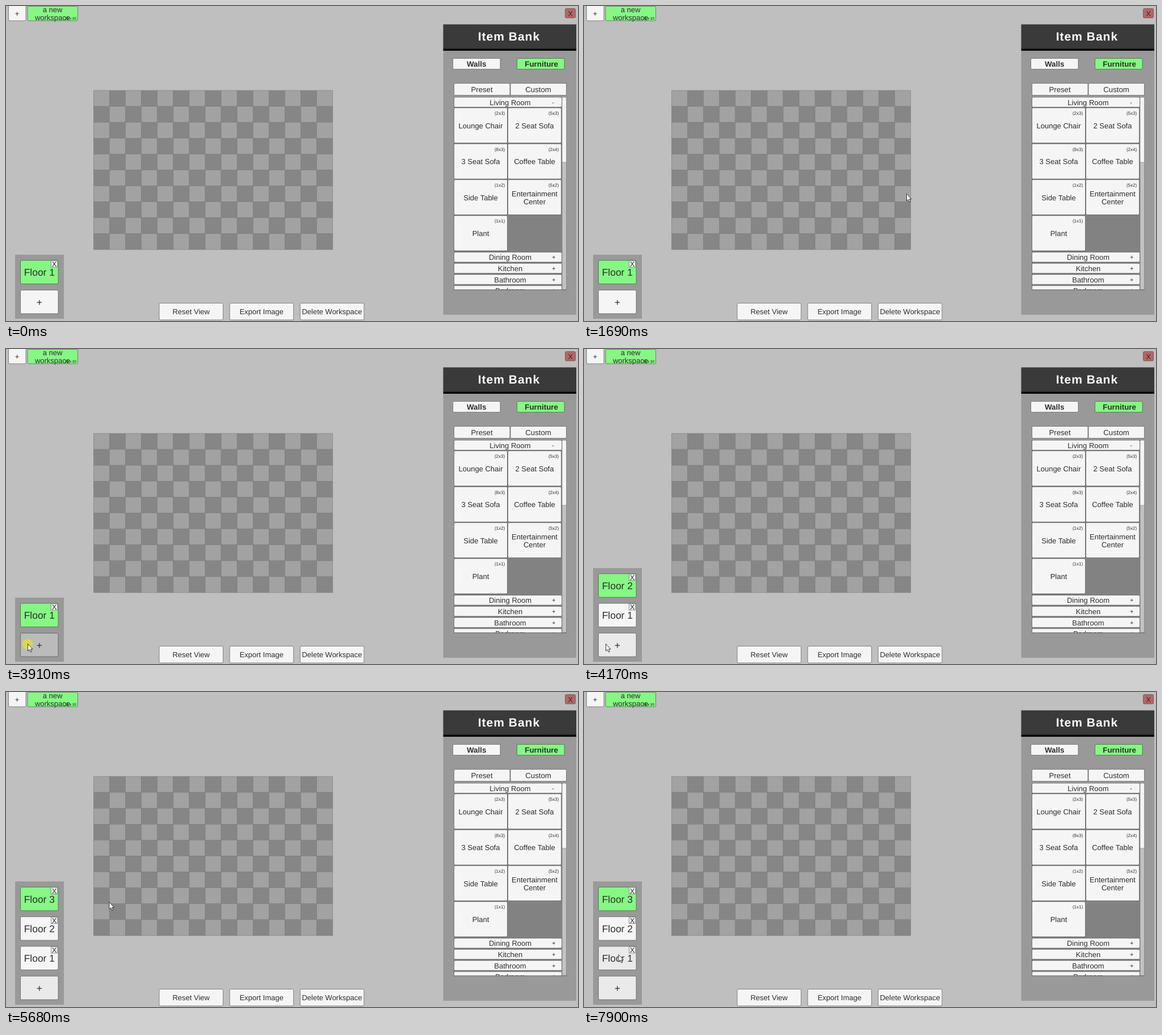
Write an HTML page that moves like this. It is 1008 by 556 pixels and loops after 8000 ms.

```html
<!DOCTYPE html>
<html lang="en">
<head>
<meta charset="utf-8">
<title>Floor planner</title>
<style>
  html, body { margin: 0; width: 100%; height: 100%; overflow: hidden; background: #bfbfbf; }
  svg {
    display: block; width: 100%; height: 100%; fill: #2e2e2e; text-anchor: middle;
    font-family: "Liberation Sans", Arial, sans-serif; text-rendering: geometricPrecision;
  }
</style>
</head>
<body>
<svg id="stage" viewBox="0 0 1008 556"></svg>
<script>
const LOOP = 8000, STEP = 70;
const GREEN = '#86f784', WHITE = '#f5f5f5', PANEL = '#999';
const stage = document.getElementById('stage');

function add(parent, tag, attrs) {
  const el = document.createElementNS('http://www.w3.org/2000/svg', tag);
  for (const k in attrs) el.setAttribute(k, attrs[k]);
  return parent.appendChild(el);
}
function box(x, y, width, height, fill, extra, parent = stage) {
  return add(parent, 'rect', { x, y, width, height, fill, ...extra });
}
// Text placed by the middle of its capitals
function label(str, x, y, size = 13, extra = {}, parent = stage) {
  add(parent, 'text', { x, y: y + size * 0.36, 'font-size': size, ...extra }).textContent = str;
}
function button(x, y, w, h, fill = WHITE, parent = stage) {
  return box(x, y, w, h, fill, { rx: 2, stroke: '#333', 'stroke-width': .8, 'stroke-opacity': .65 }, parent);
}

// Top bar
button(4.5, -2.5, 30.5, 28.5);
label('+', 19.5, 13.5);
button(38, .5, 88.5, 25.5, GREEN);
label('a new', 82, 6);
label('workspace', 82, 20);
label('15 x 10', 123.8, 21.5, 6.3, { 'text-anchor': 'end', fill: '#000' });
button(985.5, 4.5, 18, 16.5, '#b66565');
label('X', 994.5, 13);

// Floor grid
const CELL = 28.1;
for (let r = 0; r < 10; r++)
  for (let c = 0; c < 15; c++)
    box(154.3 + c * CELL, 149 + r * CELL, CELL, CELL, (r + c) % 2 ? '#868686' : '#a2a2a2',
      { stroke: '#7c7c7c', 'stroke-width': .6 });

// Bottom buttons
['Reset View', 'Export Image', 'Delete Workspace'].forEach((name, i) => {
  button(270 + i * 124.2, 524.5, 112.5, 29.5);
  label(name, 326.2 + i * 124.1, 539.5);
});

// Item bank
const BOLD = { 'font-weight': 700 };
box(770.5, 32.5, 234.5, 512.5, PANEL);
box(770.5, 32.5, 234.5, 43.5, '#3a3a3a');
box(770.5, 75.5, 234.5, 3.5, '#050505');
label('Item Bank', 886.4, 53.5, 21, { ...BOLD, 'letter-spacing': 1, fill: '#fff' });
['Walls', 'Furniture'].forEach((name, i) => {
  button(787.5 + i * 113, 92.5, 83.5, 19, i ? GREEN : WHITE);
  label(name, 829.2 + i * 114.4, 102, 13.4, BOLD);
});
['Preset', 'Custom'].forEach((name, i) => {
  button(789.5 + i * 99.5, 136.5, 98.5, 21);
  label(name, 838.5 + i * 99.5, 147, 13.2);
});

box(0, 0, 0, 0, 'none');
add(add(stage, 'clipPath', { id: 'list' }), 'rect', { x: 788, y: 160.5, width: 200, height: 340.5 });
const list = add(stage, 'g', { 'clip-path': 'url(#list)' });
box(789, 161, 191, 340, '#828282', {}, list);

const hovers = [];
function item(x, y, w, h) {
  hovers.push({ el: button(x, y, w, h, WHITE, list), x, y, w, h });
}
function heading(name, cy, sign, signX) {
  item(789.5, cy - 8.5, 190, 17.5);
  label(name, 888.5, cy + .5, 13, {}, list);
  label(sign, signX, cy + .3, 11, {}, list);
}
heading('Living Room', 169.5, '-', 964);
['Lounge Chair|2x3', '2 Seat Sofa|5x3', '3 Seat Sofa|8x3', 'Coffee Table|2x4',
 'Side Table|1x2', 'Entertainment Center|5x2', 'Plant|1x1'].forEach((entry, i) => {
  const [name, size] = entry.split('|');
  const x = 789.5 + i % 2 * 95, y = 179.8 + Math.floor(i / 2) * 63.4;
  item(x, y, 94, 62);
  label(`(${size})`, x + 89.7, y + 9.5, 8, { 'text-anchor': 'end' }, list);
  const lines = name.length > 15 ? name.split(' ') : [name];
  lines.forEach((s, j) => label(s, x + 47, y + 31.5 + (j - (lines.length - 1) / 2) * 14.5, 13, {}, list));
});
['Dining Room', 'Kitchen', 'Bathroom', 'Bedroom'].forEach((name, i) => heading(name, 443 + i * 19.7, '+', 965.3));
box(980, 161, 7.5, 340, '#c2c2c2', { stroke: '#7d7d7d', 'stroke-width': .7 }, list);
box(980, 161, 7.5, 115, WHITE, { rx: 2, stroke: '#8a8a8a', 'stroke-width': .7 }, list);
box(789, 500.4, 199, 1, '#5f5f5f');

// Floor list
const PITCH = 52.3;
const floorPanel = box(16, 439, 86, 113, PANEL);
const floors = [1, 2, 3].map(n => {
  const g = add(stage, 'g', {}), y = 449 - (n - 1) * PITCH;
  const area = { x: 25.5, y, w: 66.5, h: 41.5 };
  const el = button(area.x, y, area.w, area.h, WHITE, g);
  label('Floor ' + n, 58.8, y + 21, 17.4, {}, g);
  box(79.5, y + .5, 11, 11.5, WHITE, { stroke: '#777', 'stroke-width': .8 }, g);
  label('X', 85, y + 6.5, 13, {}, g);
  return { g, el, area };
});
const plusArea = { x: 25.5, y: 501.5, w: 66.5, h: 41.5 };
const plus = button(25.5, 501.5, 66.5, 41.5);
label('+', 58.8, 523, 17.4);

// Pointer
const ring = add(stage, 'circle', { cx: 38, cy: 521.3, r: 9.5, fill: '#dfda43', opacity: .85 });
const pointer = add(stage, 'path', {
  d: 'M0 0V12.5L2.9 10L4.8 14.5L6.8 13.6L5 9.2H8.5Z',
  fill: '#fff', stroke: '#222', 'stroke-width': .9, 'stroke-linejoin': 'round'
});

// A bent stroke from a to b that slows down
const curve = (a, bend, b) => p => {
  const u = 1 - (1 - p) ** 1.3;
  return a.map((v, k) => (1 - u) ** 2 * v + 2 * u * (1 - u) * bend[k] + u * u * b[k]);
};
// One anticlockwise turn from the top that speeds up
const loopRound = (cx, cy, rx, ry) => p => {
  const a = 2 * Math.PI * p ** 1.4;
  return [cx - rx * Math.sin(a), cy - ry * Math.cos(a)];
};
const rest = [568.5, 331.5], click = [38.5, 520.5], low = [38.5, 522];
const moves = [
  { from: 330, to: 900, path: curve([969, 536], [700, 370], rest) },
  { from: 1690, to: 2460, path: curve(rest, [680, 350], [167, 453]) },
  { from: 2530, to: 3310, path: curve([125, 465], [-20, 500], [38, 518.5]) },
  { from: 3580, to: 3580, path: () => click },
  { from: 4500, to: 4630, path: curve(click, low, low) },
  { from: 5260, to: 5960, path: curve([35, 515], [-30, 400], [395, 318]) },
  { from: 6360, to: 6710, path: curve([430, 305], [640, 210], [873, 169]) },
  { from: 6710, to: 7120, path: loopRound(873.5, 232, 39.5, 63) },
  { from: 7190, to: 7900, path: curve([795, 182], [330, 340], [61, 463.5]) }
];
const clicks = [{ down: 3850, up: 4050 }, { down: 4780, up: 4920 }];

function pointerAt(t) {
  const move = moves.filter(m => m.from <= t).pop();
  if (!move) return null;
  const { from, to, path } = move;
  return path(t >= to ? 1 : Math.floor((t - from) / STEP) * STEP / (to - from));
}

// The highlight lingers for one step after the pointer leaves
function hovered(t, { x, y, w, h }) {
  return [t, t - STEP].map(pointerAt).some(p =>
    p && p[0] >= x && p[0] <= x + w && p[1] >= y && p[1] <= y + h);
}
const tint = on => on ? '#eaeaea' : WHITE;
const show = (el, on) => el.setAttribute('visibility', on ? 'visible' : 'hidden');

function draw(t) {
  const added = clicks.filter(c => t >= c.up).length;
  floorPanel.setAttribute('y', 439 - added * PITCH);
  floorPanel.setAttribute('height', 113 + added * PITCH);
  floors.forEach(({ g, el, area }, i) => {
    show(g, i <= added);
    el.setAttribute('fill', i === added ? GREEN : tint(hovered(t, area)));
  });

  const pressed = clicks.some(c => t >= c.down && t < c.up);
  const selected = t >= clicks[0].down;
  plus.setAttribute('fill', pressed ? '#bbb' : tint(selected || hovered(t, plusArea)));
  show(ring, clicks.some(c => t >= c.down && t < c.up + STEP));

  hovers.forEach(h => h.el.setAttribute('fill', tint(hovered(t, h))));

  const p = pointerAt(t);
  show(pointer, p);
  if (p) pointer.setAttribute('transform', `translate(${p[0]} ${p[1]})`);
}

const begin = performance.now();
function tick() {
  draw((performance.now() - begin) % LOOP);
  requestAnimationFrame(tick);
}
tick();
</script>
</body>
</html>
```
